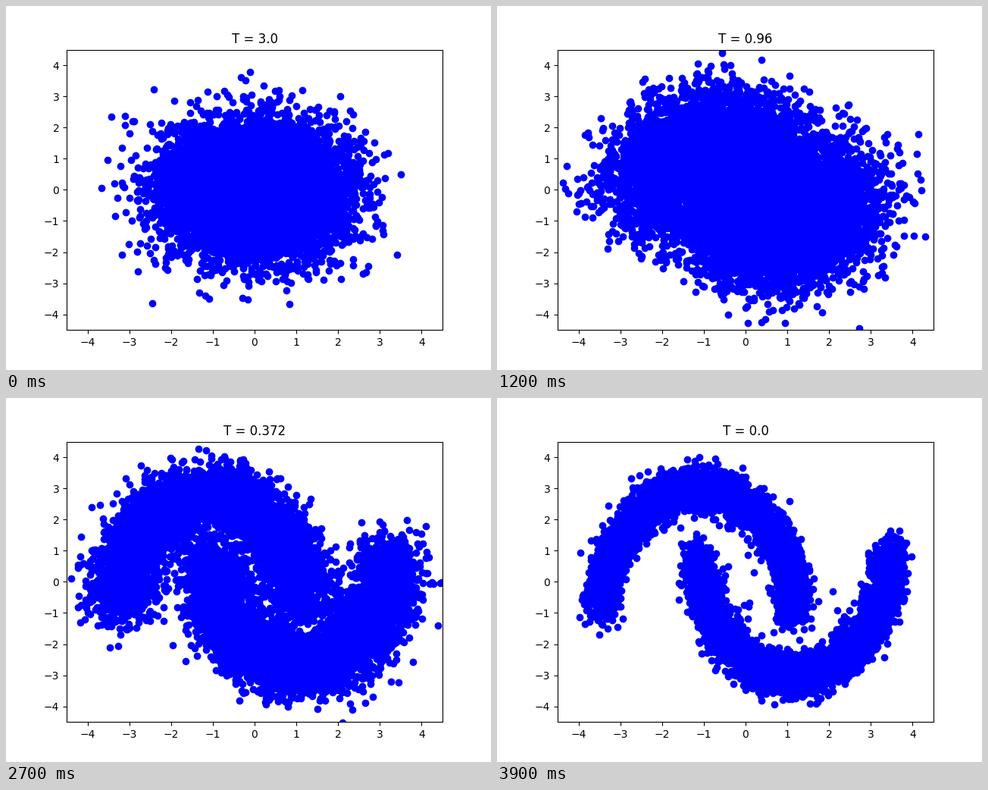
Recreate the animation shown at these times as a matplotlib script. Size 640 px wide and 480 px high, loop 4 s.

```python
import math

import matplotlib.pyplot as plt
import numpy as np
from matplotlib.animation import FuncAnimation

FRAMES = 40
INTERVAL = 100
COUNT = 10000
RATE = 0.75
NOISE = 0.08
BRIDGES = 60

# Diffusion time at a few frames; erf easing fills in the rest
KEY_TIMES = {0: 3.0, 8: 1.194, 12: 0.96, 16: 0.776,
             23: 0.507, 31: 0.244, 39: 0.0}

rng = np.random.default_rng(7)


def schedule():
    """Diffusion times, evenly spaced in erf(RATE * T) between the keys."""
    grid = np.linspace(0, 3, 6001)
    erf_grid = np.array([math.erf(RATE * t) for t in grid])
    key_levels = [math.erf(RATE * t) for t in KEY_TIMES.values()]
    levels = np.interp(range(FRAMES), list(KEY_TIMES), key_levels)
    return np.interp(levels, erf_grid, grid)


def two_moons():
    angle = rng.uniform(0, math.pi, COUNT)
    upper = np.arange(COUNT) % 2 == 0
    x = np.where(upper, np.cos(angle), 1 - np.cos(angle))
    y = np.where(upper, np.sin(angle), 0.5 - np.sin(angle))
    points = np.column_stack([x, y])
    points += NOISE * rng.standard_normal((COUNT, 2))

    # A few points stray from one place on the moons towards another
    pull = rng.uniform(0, 0.5, (BRIDGES, 1))
    points[:BRIDGES] += pull * (points[-BRIDGES:] - points[:BRIDGES])
    return (points - [0.5, 0.25]) * [2.3, 4.0]


def cloud_path(times):
    """Noise the moons step by step; played backwards this denoises them."""
    keep = np.exp(-(RATE * times) ** 2)
    states = [two_moons()]
    for k in range(FRAMES - 1, 0, -1):
        ratio = keep[k - 1] / keep[k]
        noise = rng.standard_normal((COUNT, 2))
        states.append(ratio * states[-1] + math.sqrt(1 - ratio ** 2) * noise)
    return states[::-1]


times = schedule()
states = cloud_path(times)

fig, ax = plt.subplots(figsize=(6.4, 4.8), dpi=100)
ax.set_xlim(-4.5, 4.5)
ax.set_ylim(-4.5, 4.5)
ax.set_xticks(range(-4, 5))
ax.set_yticks(range(-4, 5))
dots, = ax.plot([], [], "bo")
title = ax.set_title("T = 3.0")


def update(frame):
    dots.set_data(*states[frame].T)
    title.set_text(f"T = {round(float(times[frame]), 3)}")
    return dots, title


anim = FuncAnimation(fig, update, frames=FRAMES, interval=INTERVAL,
                     repeat=True, repeat_delay=0, blit=False)
plt.show()
```
